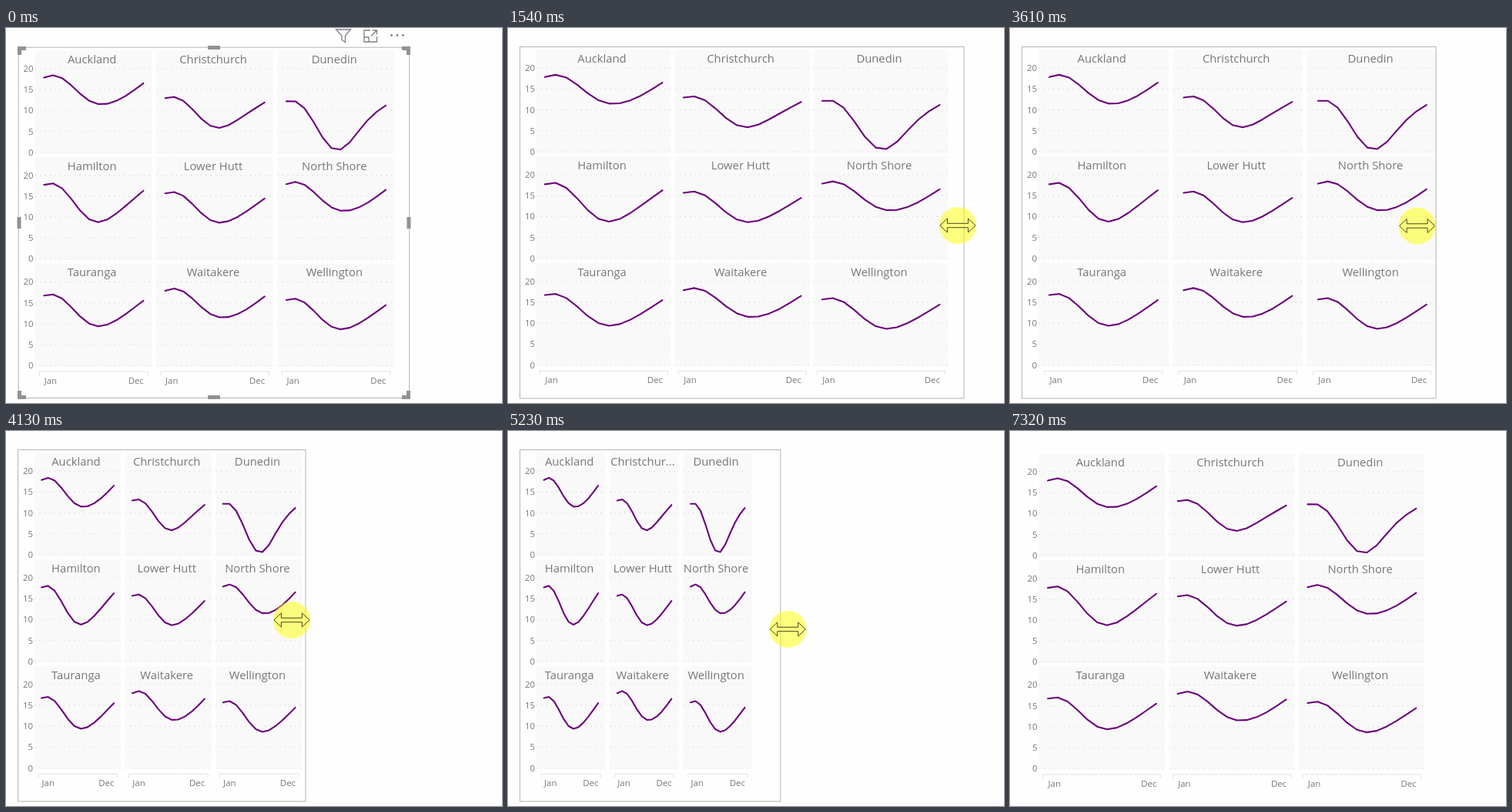
Write an HTML page that moves like this. It is 644 by 488 pixels and loops after 8210 ms.

```html
<!DOCTYPE html>
<html lang="en">
<head>
<meta charset="utf-8">
<title>Resizing small multiples</title>
<style>
  html, body { margin: 0; width: 100%; height: 100%; overflow: hidden; background: #fefefe; }
  svg { display: block; width: 644px; height: 488px; font-family: "Open Sans", "Noto Sans", sans-serif; }
  .title { font-size: 14.8px; fill: #777; text-anchor: middle; }
  .label { font-size: 11.4px; fill: #777; }
  .end { text-anchor: end; }
  .grid { stroke: #d2d2d2; stroke-width: 1.1; stroke-dasharray: 1.1 5.3; }
  .axis { stroke: #e2e2e2; fill: none; }
  .line { stroke: #6b007b; stroke-width: 2.1; fill: none; stroke-linejoin: round; stroke-linecap: round; }
  .frame { stroke: #b4b4b4; fill: none; }
  .icon { stroke: #7f7f88; stroke-width: 1.3; fill: none; }
</style>
</head>
<body>
<svg id="stage" viewBox="0 0 644 488"></svg>
<script>
const LOOP = 8210, LAG = 76, GRAB = 1140, DROP = 7020, FADE = 300;
const stage = document.getElementById('stage');
const pen = document.createElement('canvas').getContext('2d');
pen.font = '14.8px "Open Sans", "Noto Sans", sans-serif';

// a year of temperatures: mean plus a yearly and a half-yearly wave
function year(mean, a1, b1, a2, b2) {
  return Array.from({ length: 12 }, (_, m) => {
    const p = m * Math.PI / 6;
    return mean + a1 * Math.cos(p) + b1 * Math.sin(p) + a2 * Math.cos(2 * p) + b2 * Math.sin(2 * p);
  });
}

const north = year(14.72, 3.18, 1.31, -0.02, 0.33);
const south = year(12.21, 3.51, 0.9, -0.05, 0.37);
const cities = [
  ['Auckland', north],
  ['Christchurch', year(9.57, 3.56, 0.59, -0.17, 0.42)],
  ['Dunedin', year(6.95, 5.78, -0.19, -0.54, 0.68)],
  ['Hamilton', year(13.37, 4.47, 0.9, -0.13, 0.49)],
  ['Lower Hutt', south],
  ['North Shore', north],
  ['Tauranga', year(13.09, 3.67, 0.88, -0.04, 0.36)],
  ['Waitakere', north],
  ['Wellington', south]
];

// turning points of the pointer: time, x, y
const path = [
  [70, 580, 428], [700, 522, 255], [1100, 522, 255], [1380, 590, 257], [1465, 590, 257],
  [1540, 584, 257], [1690, 573, 257], [2350, 632, 257], [2620, 621, 256], [3300, 620, 256],
  [3610, 529, 257.5], [3980, 403, 249], [4130, 371, 246], [4620, 319, 257], [5000, 319, 257],
  [5156, 352, 258], [5230, 363, 258], [5830, 522, 260], [5930, 539, 260], [6080, 539, 260],
  [6480, 556, 260], [LOOP, 556, 260]
];

function pointer(t) {
  const i = Math.max(1, path.findIndex(k => k[0] >= t));
  const [t0, x0, y0] = path[i - 1], [t1, x1, y1] = path[i];
  const u = Math.max(0, (t - t0) / (t1 - t0));
  return [x0 + (x1 - x0) * u, y0 + (y1 - y0) * u];
}

function fit(name, room) {
  if (pen.measureText(name).width <= room) return name;
  while (name.length > 1 && pen.measureText(name + '...').width > room) name = name.slice(0, -1);
  return name + '...';
}

const num = v => +v.toFixed(2);
const text = (cls, x, y, s) => `<text class="${cls}" x="${num(x)}" y="${num(y)}">${s}</text>`;
const shape = (cls, d) => `<path class="${cls}" d="${d}"/>`;
const box = (x, y, w, h, look) =>
  `<rect x="${num(x)}" y="${num(y)}" width="${num(w)}" height="${num(h)}" ${look}/>`;

function charts(right, dx, dy) {
  const pitch = (right - 52) / 3, w = pitch - 5.6;
  // month spacing snaps to whole units
  const gap = Math.floor((w - 6) / 12.8) * 12.8 / 12;
  let out = '';
  cities.forEach(([name, data], i) => {
    const row = Math.floor(i / 3), col = i % 3;
    const x = 37 + dx + col * pitch, top = dy + row * 138.75, mid = x + w / 2;
    const first = mid - gap * 5.5, last = mid + gap * 5.5;
    const py = v => num(top + 161 - v * 5.44);
    out += box(x, top + 28.5, w, 134, 'fill="#f9f9f9"');
    for (let v = 0; v <= 20; v += 5) {
      out += shape('grid', `M${num(x)} ${py(v)}h${num(w)}`);
      if (!col) out += text('label end', 35 + dx * 0.5, py(v) + 4, v);
    }
    out += shape('line', 'M' + data.map((v, m) => num(first + m * gap) + ' ' + py(v)).join('L'));
    out += text('title', mid - 2.2, top + 45.2, fit(name, w - 4));
    if (row === 2) {
      const y = dy + 446.3, half = gap * 6;
      out += shape('axis', `M${num(mid - half)} ${y + 5}v-5h${num(half * 2)}v5`);
      out += text('label', first + 0.4, dy + 462.3, 'Jan') + text('label end', last + 0.4, dy + 462.3, 'Dec');
    }
  });
  return out;
}

function selection() {
  const grey = 'fill="#929292"';
  let out = box(16.2, 25.2, 507.5, 456.3, 'class="frame"');
  for (const x of [15, 525]) for (const y of [24, 483]) {
    const sx = x < 99 ? 1 : -1, sy = y < 99 ? 1 : -1;
    out += `<path ${grey} d="M${x} ${y}h${11 * sx}v${5 * sy}h${-6 * sx}v${6 * sy}h${-5 * sx}z"/>`;
  }
  for (const y of [23, 478]) out += box(262, y, 16, 5, grey);
  for (const x of [14.5, 520.5]) out += box(x, 246, 5, 15, grey);
  out += shape('icon', 'M428.5 2H447.5L440.5 10V18.5L436 15.5V10Z');
  out += shape('icon', 'M473 3H465V18H481.5V11M476 3H481.5V8.5M481.5 3L474 10.5M465 12H471V18');
  for (const x of [500.5, 508, 515.5]) out += `<circle cx="${x}" cy="9.5" r="1.4" fill="#7f7f88"/>`;
  return out;
}

function cursor(x, y, resize, pressed) {
  const d = resize
    ? 'M-23 0L-13.5 -9V-2.7H13.5V-9L23 0L13.5 9V2.7H-13.5V9Z'
    : 'M0 0V26L6 20.5L10.5 30.5L14.5 28.5L10 19H18.5Z';
  const glow = pressed ? '<circle r="24" fill="#ff0" fill-opacity=".5"/>' : '';
  return `<g transform="translate(${num(x)} ${num(y)})">${glow}
    <path d="${d}" fill="${pressed ? 'none' : '#fff'}" stroke="#33331a" stroke-width=".9"/></g>`;
}

function draw(t) {
  const held = t >= GRAB;
  const fade = Math.min(1, Math.max(0, 1 - (t - DROP) / FADE));
  const shift = held ? 1 - fade : 1;
  const [x, y] = pointer(t);
  // the frame trails the pointer, the charts trail the frame
  const edge = pointer(t - LAG)[0] + 2;
  const right = held ? pointer(t - 2 * LAG)[0] + 2 : 524;
  let out = charts(right, shift, shift * 0.7);
  out += held ? box(15.5, 24.5, edge - 15.5, 457.5, `class="frame" opacity="${num(fade)}"`) : selection();
  if (t >= 70) out += `<g opacity="${num(fade)}">${cursor(x, y, t >= 640, t >= 990)}</g>`;
  stage.innerHTML = out;
}

const begin = performance.now();
function tick() {
  draw((performance.now() - begin) % LOOP);
  requestAnimationFrame(tick);
}
tick();
</script>
</body>
</html>
```
